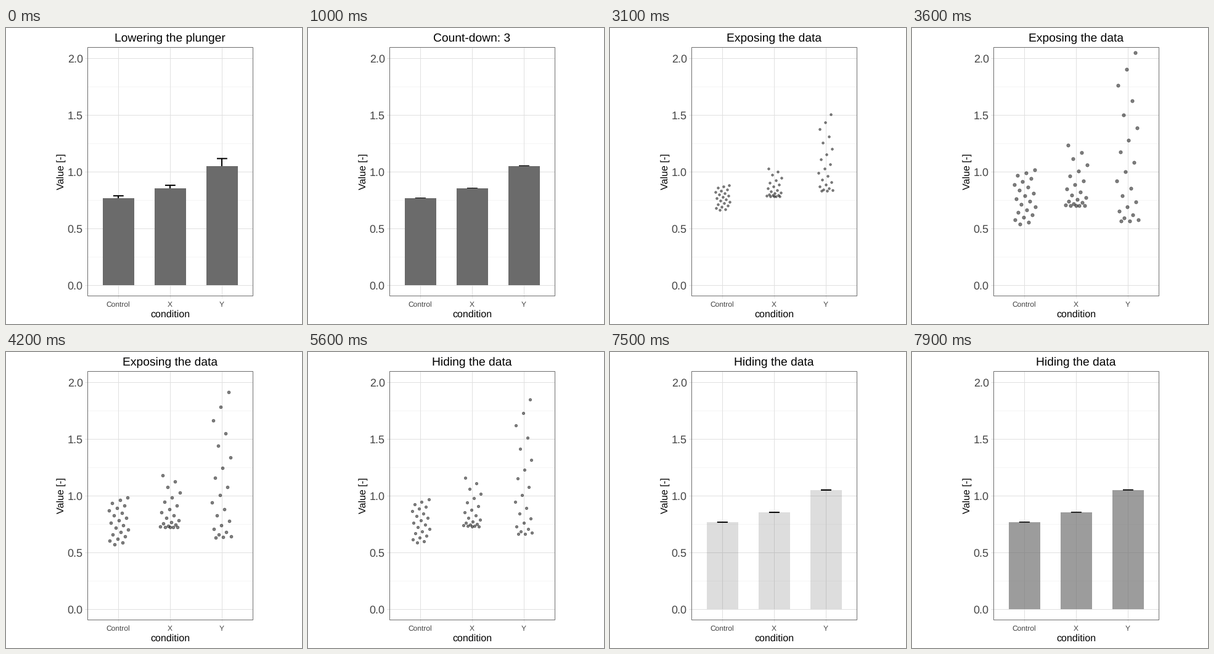
A matplotlib script for the animation above (8000 ms loop, 480 by 480 pixels).

```python
import matplotlib.pyplot as plt
import numpy as np
from matplotlib.animation import FuncAnimation
from matplotlib.patches import Rectangle

plt.rcParams["font.family"] = "Liberation Sans"
plt.rcParams["text.hinting"] = "none"

SIZE, DPI = 480, 72          # at 72 dpi one point is one pixel
STEP, FRAMES = 100, 80       # ms per frame, frames per loop
LEFT, RIGHT, TOP, BOTTOM = 132, 400, 31, 434
MIDDLE = (LEFT + RIGHT) / 2
ZERO, UNIT = 417, 183.8      # pixel row of value 0, pixels per unit
SPACING, BAR_W, CAP_W = 84.05, 50.6, 16.8
JITTER, PER_GROUP = 16.5, 21
GOLDEN = (5 ** 0.5 - 1) / 2

# name, mean, error, lowest, highest, jitter phase
GROUPS = [("Control", 0.767, 0.021, 0.57, 0.985, 0.95),
          ("X", 0.854, 0.027, 0.72, 1.185, 0.12),
          ("Y", 1.051, 0.066, 0.63, 1.92, 0.82)]


def row(value):
    return ZERO - UNIT * value


def center(k):
    return 182.3 + SPACING * k


def cloud(k):
    """Skewed, evenly ranked values with a golden-ratio jitter."""
    _, mean, _, low, high, phase = GROUPS[k]
    i = np.arange(PER_GROUP)
    skew = (high - low) / (mean - low) - 1
    values = low + (high - low) * (1 - i / (PER_GROUP - 1)) ** skew
    shift = 2 * ((phase + i * GOLDEN) % 1) - 1
    return np.column_stack([center(k) + JITTER * shift, row(values)])


def back_out(p):
    q = min(p, 1) - 1
    return 1 + 2.70158 * q ** 3 + 1.70158 * q ** 2


def ring(t, half, damp=1.87):
    """Damped swing from 1 to 0; `half` is the half period in ms."""
    a = np.pi * t / half
    return np.exp(-damp * t / half) * (np.cos(a) + damp / np.pi * np.sin(a))


def spread(t):
    """Horizontal (and size) and vertical scale of the point clouds."""
    if t < 5600:
        return back_out((t - 2800) / 1400), 1 - ring(t - 2800, 815)
    return (1 - (t - 5500) / 1800) ** 2, ring(t - 5500, 850)


def bar_alpha(t):
    if t < 2900:
        return min(1, (5 - t // 500) / 3)
    return max(0, (t - 7300) / 900)


def heading(t):
    if t < 1000:
        return "Lowering the plunger"
    if t < 2900:
        return f"Count-down: {5 - t // 500}"
    return "Exposing the data" if t < 5600 else "Hiding the data"


fig = plt.figure(figsize=(SIZE / DPI, SIZE / DPI), dpi=DPI, facecolor="white")
ax = fig.add_axes([0, 0, 1, 1])
ax.set(xlim=(0, SIZE), ylim=(SIZE, 0))
ax.axis("off")


def line(x, y, color, width=1, z=1):
    return ax.plot(x, y, color=color, lw=width, zorder=z,
                   solid_capstyle="butt")[0]


def label(x, y, text, size, color="black", **kw):
    kw = {"ha": "center", "va": "baseline", **kw}
    return ax.text(x, y, text, fontsize=size, color=color, **kw)


# grid, ticks and axis text
for v in np.arange(0.25, 2, 0.5):
    line([LEFT, RIGHT], [row(v)] * 2, "#f5f5f5")
for v in np.arange(0, 2.5, 0.5):
    line([LEFT - 4, RIGHT], [row(v)] * 2, "#e0e0e0")
    label(124.8, row(v) + 6.4, f"{v:.1f}", 18, "#444444", ha="right")
for k, group in enumerate(GROUPS):
    line([center(k)] * 2, [TOP, BOTTOM + 4], "#e0e0e0")
    label(center(k) - 0.3, 452, group[0], 12, "#444444")
label(MIDDLE, 469, "condition", 16)
label(90, 232.5, "Value [-]", 16, rotation=90, va="center")
ax.add_patch(Rectangle((LEFT, TOP), RIGHT - LEFT, BOTTOM - TOP, fill=False,
                       ec="#6e6e6e", lw=1, zorder=6))
title = label(MIDDLE, 22, "", 19.2)

# the bars cover the lower half of their error bars
bars, caps, stems = [], [], []
for k, group in enumerate(GROUPS):
    x, y = center(k), row(group[1])
    bars.append(ax.add_patch(Rectangle((x - BAR_W / 2, y), BAR_W, ZERO - y,
                                       fc="#6b6b6b", lw=0, zorder=4)))
    caps.append([line([x - CAP_W / 2, x + CAP_W / 2], [0, 0], "black", 2, 3)
                 for _ in range(2)])
    for cap in caps[k]:
        cap.set_snap(False)
    stems.append(line([x, x], [0, 0], "black", 2, 3))

full = np.concatenate([cloud(k) for k in range(3)])
home = np.repeat([(center(k), row(g[1])) for k, g in enumerate(GROUPS)],
                 PER_GROUP, axis=0)
dots = ax.scatter(*full.T, color=(0, 0, 0, 0.5), lw=0.7, zorder=5)


def draw(i):
    t = i * STEP
    title.set_text(heading(t))

    alpha = bar_alpha(t)
    error_scale = max(0, 1 - t / 1000)
    exposed = 2900 <= t < 7400
    for k, (_, mean, error, *_) in enumerate(GROUPS):
        bars[k].set_alpha(alpha)
        ends = [row(mean + s * error_scale * error) for s in (1, -1)]
        for cap, y in zip(caps[k], ends):
            cap.set_ydata([y, y])
        stems[k].set_ydata(ends)
        for part in (*caps[k], stems[k]):
            part.set_visible(not exposed)

    dots.set_visible(exposed)
    if exposed:
        sx, sy = spread(t)
        dots.set_offsets(home + (full - home) * [sx, sy])
        dots.set_sizes([(4.8 * sx + 0.1) ** 2])


anim = FuncAnimation(fig, draw, frames=FRAMES, interval=STEP,
                     init_func=lambda: draw(0), repeat=True)
plt.show()
```
